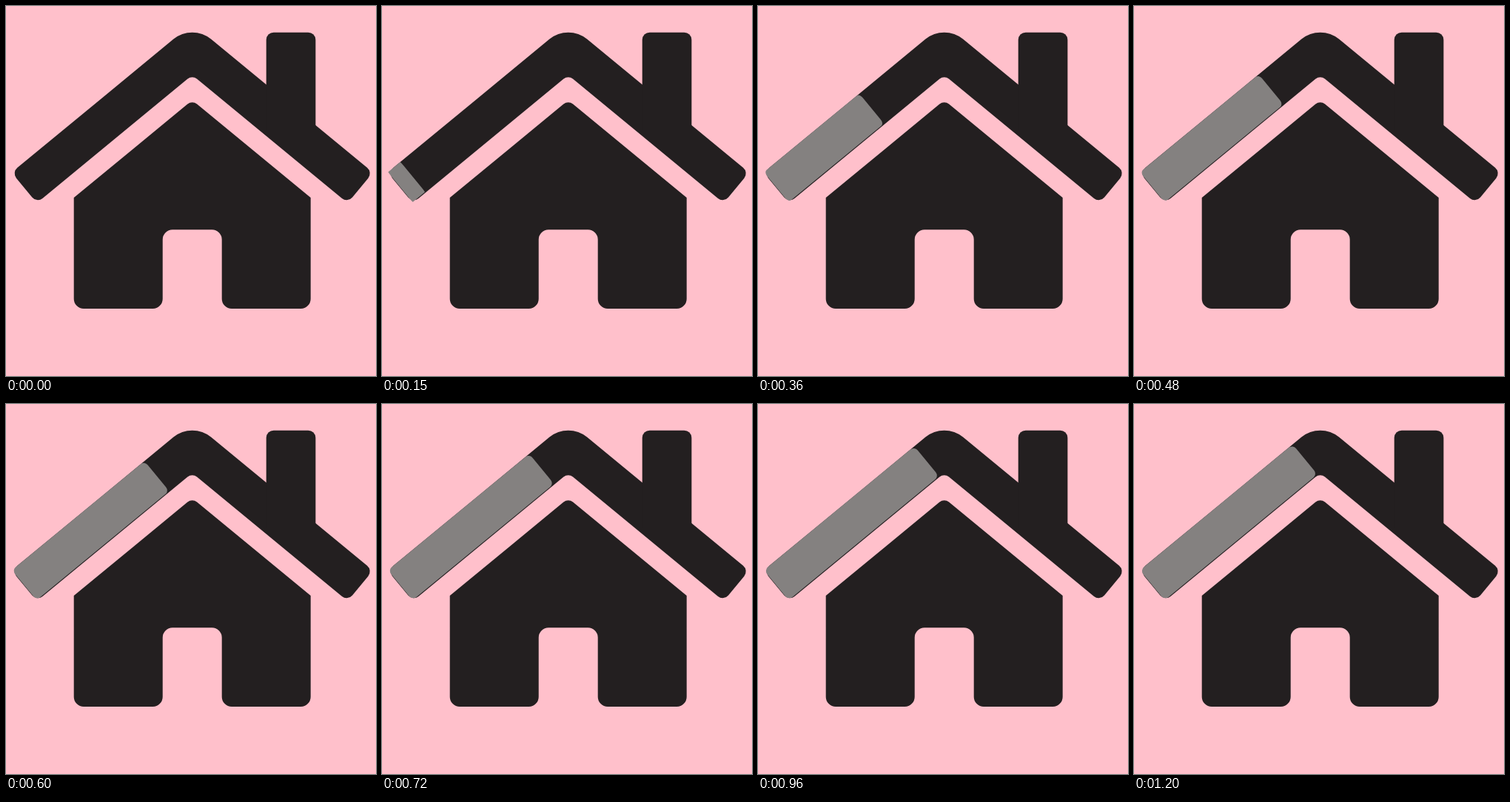
These frames come from a looping animation (500 by 500 pixels, 1.53 s). An HTML page with a canvas:

```html
<!DOCTYPE html>
<html lang="en">
<head>
<meta charset="utf-8">
<title>House</title>
<style>
  html, body { margin: 0; width: 100%; height: 100%; overflow: hidden; background: #ffc0cb; }
  canvas { display: block; width: 500px; height: 500px; }
</style>
</head>
<body>
<canvas id="stage" width="500" height="500"></canvas>
<script>
const ctx = document.getElementById("stage").getContext("2d");

const PINK = "#ffc0cb";
const INK = "#231f20";
const GREY = "#848180";

const LOOP = 1530;
const STEP = 30;
const GROW = 1200;

// House units: x runs from the axis of symmetry, y from above the ridge.
const SLOPE = 0.8236;
const PITCH = Math.atan(SLOPE);
const RIDGE = 17.9;
const THICKNESS = 64.2;
const EAVE = 292.9;

const corner = (x, y, radius = 0) => ({ x, y, radius });
const onSlope = (peak, x, radius) => corner(x, peak + SLOPE * x, radius);

// Completes the right half of an outline with its mirror image.
function mirrored(half) {
  const left = half.filter(p => p.x > 0).reverse().map(p => corner(-p.x, p.y, p.radius));
  return [...half, ...left];
}

function roofOutline() {
  const upper = onSlope(RIDGE, EAVE, 12);
  const lower = corner(
    upper.x - THICKNESS * Math.sin(PITCH),
    upper.y + THICKNESS * Math.cos(PITCH),
    12
  );
  const innerRidge = RIDGE + THICKNESS / Math.cos(PITCH);
  return mirrored([corner(0, RIDGE, 48), upper, lower, corner(0, innerRidge, 12)]);
}

function bodyOutline() {
  const peak = 142, wall = 192, door = 48, floor = 480, lintel = 352;
  return mirrored([
    corner(0, peak, 12),
    onSlope(peak, wall),
    corner(wall, floor, 16),
    corner(door, floor, 16),
    corner(door, lintel, 16)
  ]);
}

function fillOutline(corners) {
  const first = corners[0], last = corners[corners.length - 1];
  ctx.beginPath();
  ctx.moveTo((first.x + last.x) / 2, (first.y + last.y) / 2);
  corners.forEach((p, i) => {
    const next = corners[(i + 1) % corners.length];
    ctx.arcTo(p.x, p.y, next.x, next.y, p.radius);
  });
  ctx.fill();
}

function fillBox(x, y, width, height, radius) {
  ctx.beginPath();
  ctx.roundRect(x, y, width, height, radius);
  ctx.fill();
}

// cubic-bezier(1/3, 0, 0, 1), solved by bisection
function ease(x) {
  let low = 0, high = 1;
  for (let i = 0; i < 30; i++) {
    const s = (low + high) / 2;
    if (s * (1 - s) ** 2 + s ** 3 < x) low = s;
    else high = s;
  }
  return low * low * (3 - 2 * low);
}

const roof = roofOutline();
const body = bodyOutline();

function drawHouse() {
  ctx.fillStyle = INK;
  fillOutline(roof);
  fillOutline(body);
  fillBox(120, 32, 80, 158, [12, 12, 0, 0]);
}

// The bar lies along the left roof and stretches from its lower end.
function drawBar(scale) {
  const start = onSlope(RIDGE, EAVE);
  ctx.translate(-start.x, start.y);
  ctx.rotate(-PITCH);
  ctx.translate(0.6, 0);
  ctx.scale(scale, 1);
  ctx.fillStyle = GREY;
  fillBox(0, 0, 321, 63, 8.4);
}

function draw() {
  const time = Math.floor(performance.now() % LOOP / STEP) * STEP;
  ctx.fillStyle = PINK;
  ctx.fillRect(0, 0, 500, 500);
  ctx.save();
  ctx.translate(251.7, 9);
  ctx.scale(5 / 6, 5 / 6);
  drawHouse();
  if (time > 0) drawBar(ease(Math.min(time / GROW, 1)));
  ctx.restore();
  requestAnimationFrame(draw);
}

draw();
</script>
</body>
</html>
```
